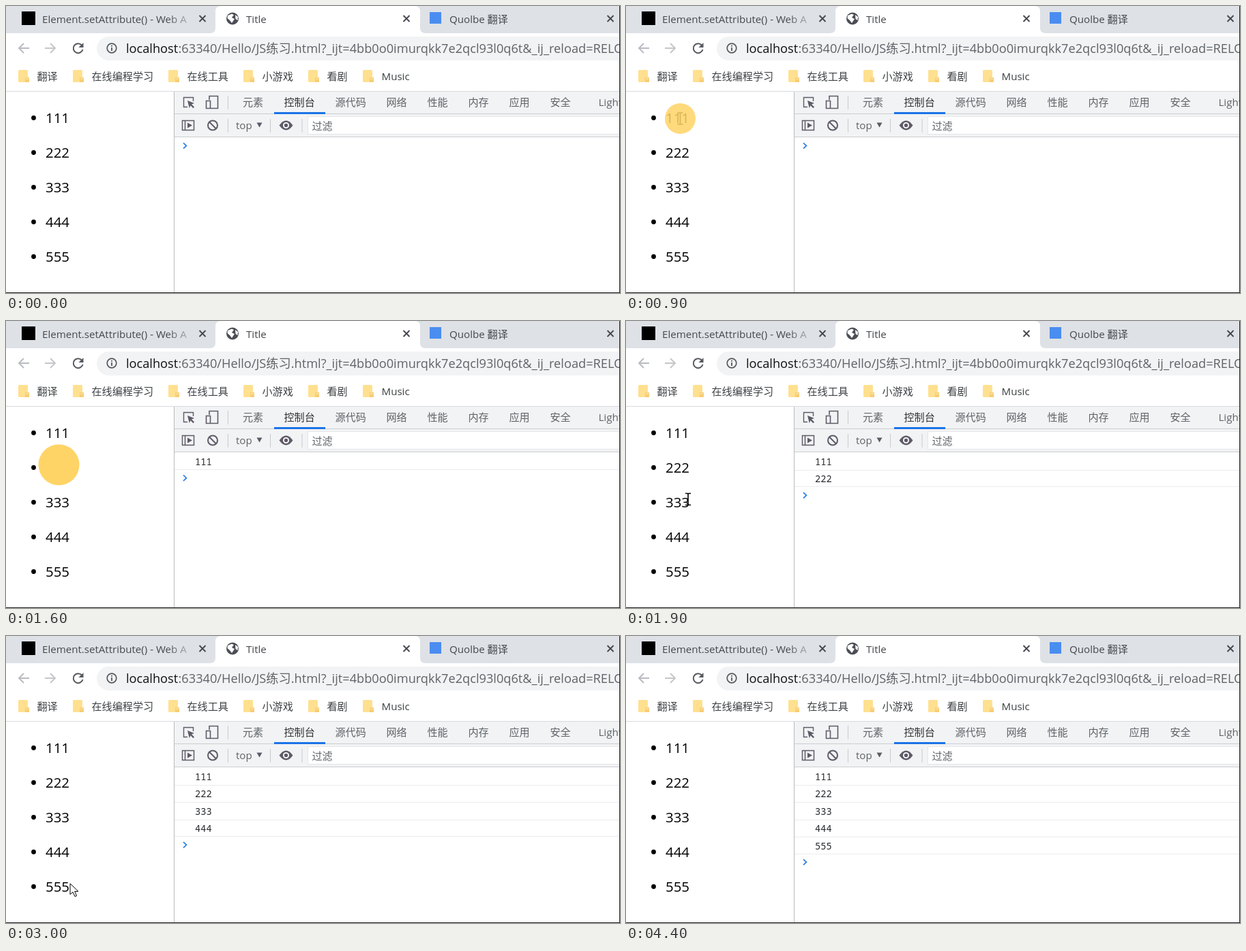
An HTML page that plays this animation: 900x422 px, repeating every 4.5 s.

```html
<!DOCTYPE html>
<html lang="zh-CN">
<head>
<meta charset="utf-8">
<title>List clicks</title>
<style>
html, body { margin: 0; width: 100%; height: 100%; overflow: hidden; background: #fff; }
svg { display: block; width: 900px; height: 422px; }
text { font-family: "Open Sans", "Noto Sans CJK SC", "Noto Sans CJK", sans-serif; font-size: 15.1px; white-space: pre; }
.url { font-size: 18.2px; }
.item { font-size: 20.4px; }
.mono { font-family: "Noto Sans Mono", "DejaVu Sans Mono", monospace; font-size: 13.7px; }
</style>
</head>
<body>
<svg id="stage" viewBox="0 0 900 422">
  <defs>
    <linearGradient id="fade" gradientUnits="userSpaceOnUse" x1="236" y1="0" x2="276" y2="0">
      <stop offset="0" stop-color="#45484d"/><stop offset="1" stop-color="#45484d" stop-opacity=".1"/>
    </linearGradient>
  </defs>
</svg>
<script>
const stage = document.getElementById("stage");

function add(tag, attrs, content) {
  const el = document.createElementNS("http://www.w3.org/2000/svg", tag);
  for (const key in attrs) el.setAttribute(key, attrs[key]);
  if (content) el.textContent = content;
  return stage.appendChild(el);
}
const rect = (x, y, width, height, fill, more) => add("rect", { x, y, width, height, fill, ...more });
const disc = (cx, cy, r, fill, more) => add("circle", { cx, cy, r, fill, ...more });
const label = (x, y, content, fill, more) => add("text", { x, y, fill, ...more }, content);
const shape = (d, fill) => add("path", { d, fill });
const line = (d, stroke, width = 1) => add("path", { d, stroke, "stroke-width": width, fill: "none" });
const show = (el, on) => el.setAttribute("visibility", on ? "visible" : "hidden");
const move = (el, x, y) => el.setAttribute("transform", `translate(${x} ${y})`);

const ink = "#45484d", soft = "#5f6368", icon = "#5f5a68", rule = "#cbcdd1";

// Tab strip
rect(0, 0, 900, 422, "#fff");
rect(0, 0, 900, 40, "#dee1e6");
shape("M299 40Q307 40 307 32V8Q307 0 315 0H599Q607 0 607 8V32Q607 40 615 40Z", "#fff");
rect(23, 8, 20, 20, "#000");
label(53, 25, "Element.setAttribute() - Web A", "url(#fade)");
disc(332, 18.5, 9, "#4b4e55");
shape("M325 14L331 11.5L334 13L331 17L335 19L331 25L328 21L324.5 18ZM336 13L340 16L339.5 21L336.5 19Z", "#fff");
label(352, 25, "Title", ink);
rect(621, 9, 17, 17, "#4a8df0");
label(650, 25, "Quolbe 翻译", ink);
for (const x of [288, 587, 886]) line(`M${x - 4.5} 14l9 9m0 -9l-9 9`, "#45474d", 1.9);

// Navigation and address
line("M34 62H19M26 55l-7 7l7 7", "#b9bbc0", 1.9);
line("M57 62H72M65 55l7 7l-7 7", "#c4c6c9", 1.9);
line("M111 57.5A7 7 0 1 0 112.5 64", "#56595f", 2);
shape("M113.5 54v7h-7z", "#56595f");
rect(133, 45, 800, 35, "#f1f3f4", { rx: 17.5 });
disc(155, 62, 6.8, "none", { stroke: "#55585e", "stroke-width": 1.7 });
rect(154.1, 61, 1.8, 5, "#55585e");
rect(154.1, 57.8, 1.8, 1.9, "#55585e");
label(176, 68.5, "localhost", "#111", { class: "url" });
label(252.5, 68.5, ":63340/Hello/JS练习.html?_ijt=4bb0o0imurqkk7e2qcl93l0q6t&_ij_reload=RELOAD", soft, { class: "url" });

// Bookmarks
const bookmarks = [[18, "翻译"], [98, "在线编程学习"], [238, "在线工具"], [348, "小游戏"], [443, "看剧"], [523, "Music"]];
for (const [x, name] of bookmarks) {
  rect(x, 94, 14, 18, "#ffe08f", { rx: 1.5 });
  shape(`M${x + 10} 105h6v7h-6z`, "#f6cd75");
  line(`M${x + 11} 107h4`, "#fff0c0");
  label(x + 27.5, 109, name, "#3c4043");
}
line("M0 125.5H900", "#d8dadf");

// Page list
for (let i = 0; i < 5; i++) {
  const y = 164.5 + 51 * i;
  disc(40.5, y, 3.4, "#000");
  label(58, y + 7.5, String(111 * (i + 1)), "#000", { class: "item" });
}

// Developer tools
rect(247, 126, 653, 67, "#f1f3f4");
line("M247 158.5H900M247 192.5H900", rule);
line("M246.5 126V421", "#b8babd");
line("M325.5 132V152M325.5 166V186M387.5 166V186M434 166V186", "#c8cacf");
line("M274.5 140V134.5H260.5V148.5H266", icon, 1.4);
shape("M266 139l10 4l-4 1.6l4 4l-1.6 1.6l-4-4l-1.6 4z", icon);
line("M298 138V132.5H310.5V150.5H300M293.5 139.5h6v11h-6z", icon, 1.6);
const panels = [[347, "元素"], [407.5, "控制台"], [482.5, "源代码"], [557.5, "网络"], [617.5, "性能"],
  [677.5, "内存"], [737.5, "应用"], [797.5, "安全"], [868.5, "Lighthouse"]];
for (const [x, name] of panels) label(x, 147, name, name === "控制台" ? "#303237" : soft);
rect(393, 156, 75, 3, "#1a73e8");
line("M258.5 168.5h17v14h-17zM262.5 168.5v14", icon, 1.5);
shape("M266 171.5l7 4l-7 4z", icon);
disc(303, 175.5, 7, "none", { stroke: icon, "stroke-width": 2 });
line("M298 170.5l10 10", icon, 2);
label(337, 181, "top", soft);
shape("M367.5 171.5h8l-4 7z", icon);
shape("M400.5 175.5Q410.5 161.5 420.5 175.5Q410.5 189.5 400.5 175.5Z", icon);
disc(410.5, 175.5, 4.5, "#fff");
disc(410.5, 175.5, 2.7, icon);
rect(442.5, 162.5, 470, 26, "#fff", { stroke: "#e4e6e8" });
label(448.5, 182, "过滤", soft);

// Console rows
const rowStep = 25.4;
const rows = Array.from({ length: 5 }, (_, i) => {
  const y = Math.round(rowStep * i);
  return [
    label(277, 212 + y, String(111 * (i + 1)), "#26282c", { class: "mono" }),
    line(`M247 ${219.5 + y}H899`, "#ececf0")
  ];
});
const prompt = line("M260 -4.2l4.4 4.2l-4.4 4.2", "#2f83e4", 1.8);

// Pointer and click halo
const arrow = add("path", { d: "M0 0V16L4 12.5L7 19L9.5 18L6.7 11.5H12Z", fill: "#fff", stroke: "#000" });
const beam = add("path", { d: "M-4 -8.5H-1L0 -7.5L1 -8.5H4M0 -7.5V7.5M-4 8.5H-1L0 7.5L1 8.5H4", fill: "none", stroke: "#000", "stroke-width": 1.6 });
const halo = disc(0, 0, 22, "#ffd466");

line("M899.5 0V422M0 421.5H900", "#222");

const path = [[200, 150, 330], [700, 79.5, 165.5], [900, 79.5, 165.5], [1000, 78, 173], [1300, 77.5, 206],
  [1600, 77.5, 211.5], [1900, 91, 262], [2000, 93, 269], [2200, 93, 273], [2400, 88, 306], [2800, 88, 312],
  [3000, 94, 364], [3200, 81, 367], [3500, 81, 369]];
const clicks = [800, 1400, 2000, 2600, 3100];
const logs = [1100, 1700, 2300, 2900, 3400];
const haloSteps = [[15, .7], [22.5, .85], [30, 1]];

function pointAt(t) {
  const i = Math.max(1, path.findIndex(p => p[0] >= t));
  const [t0, x0, y0] = path[i - 1], [t1, x1, y1] = path[i];
  const k = (t - t0) / (t1 - t0);
  return [x0 + (x1 - x0) * k, y0 + (y1 - y0) * k];
}

function render(time) {
  const t = Math.floor(time % 4500 / 100) * 100;

  const count = logs.filter(at => t >= at).length;
  rows.forEach(([text, border], i) => {
    show(text, i < count);
    show(border, i < count);
    move(border, 0, i === count - 1 ? -1 : 0); // the prompt overlaps the last border
  });
  move(prompt, 0, 205.5 + rowStep * count);

  const active = t >= 200 && t < 3500;
  const [x, y] = active ? pointAt(t) : [0, 0];
  const row = Math.round((y - 164.5) / 51);
  const overText = x >= 58 && x <= 93 && Math.abs(y - 164.5 - 51 * row) < 13;
  show(arrow, active && !overText);
  show(beam, active && overText);
  for (const el of [arrow, beam, halo]) move(el, x, y);

  const start = clicks.find(at => t >= at && t < at + 300);
  show(halo, start !== undefined);
  if (start !== undefined) {
    const [r, opacity] = haloSteps[(t - start) / 100];
    halo.setAttribute("r", r);
    halo.setAttribute("opacity", opacity);
  }
}

const begin = performance.now();
function tick() {
  render(performance.now() - begin);
  requestAnimationFrame(tick);
}
tick();
</script>
</body>
</html>
```
